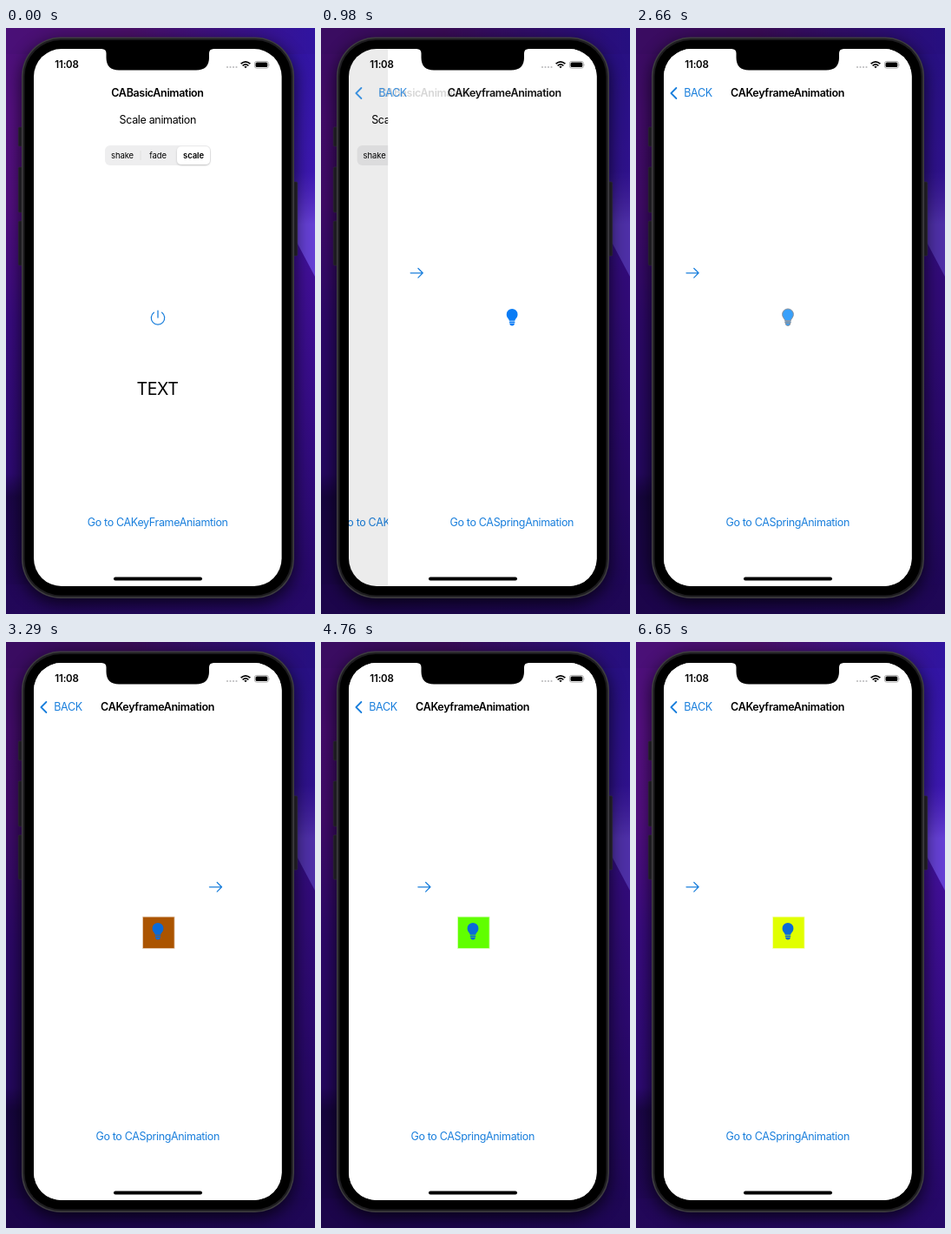
Write an HTML page that moves like this. It is 356 px wide and 674 px high and loops after 6720 ms.

```html
<!DOCTYPE html>
<html lang="en">
<head>
<meta charset="utf-8">
<title>Layer animations</title>
<style>
  html, body { margin: 0; width: 100%; height: 100%; overflow: hidden; background: #14042f; }
  svg { display: block; width: 356px; height: 674px; }
  text { font: 400 12.5px Inter, Roboto, sans-serif; letter-spacing: -.34px; text-anchor: middle; }
  .bold { font-weight: 600; }
  .link { fill: #1a7fdc; }
  .seg { font-size: 9.5px; letter-spacing: -.1px; }
  .clock { font-size: 11.5px; letter-spacing: -.2px; }
  .big { font-size: 19.6px; letter-spacing: -.4px; }
  .line { fill: none; stroke: #1a7fdc; stroke-width: 1.25; stroke-linecap: round; stroke-linejoin: round; }
</style>
</head>
<body>
<svg viewBox="0 0 356 674">
  <defs>
    <linearGradient id="leftWall" x2="0" y2="1">
      <stop offset="0" stop-color="#4a1078"/>
      <stop offset=".15" stop-color="#561082"/>
      <stop offset=".3" stop-color="#520f80"/>
      <stop offset=".5" stop-color="#390b80"/>
      <stop offset=".76" stop-color="#2e0a74"/>
      <stop offset=".8" stop-color="#1b0648"/>
      <stop offset="1" stop-color="#220758"/>
    </linearGradient>
    <linearGradient id="rightWall" x2="0" y2="1">
      <stop offset="0" stop-color="#3014a0"/>
      <stop offset=".25" stop-color="#3c18b0"/>
      <stop offset=".42" stop-color="#400f96"/>
      <stop offset=".65" stop-color="#360c86"/>
      <stop offset="1" stop-color="#240864"/>
    </linearGradient>
    <linearGradient id="ridge" x2="0" y2="1">
      <stop offset="0" stop-color="#5a35cc" stop-opacity="0"/>
      <stop offset=".5" stop-color="#6540d4"/>
    </linearGradient>
    <linearGradient id="ceiling">
      <stop offset="0" stop-color="#4a1078"/>
      <stop offset=".4" stop-color="#4a1068"/>
      <stop offset="1" stop-color="#3014a0"/>
    </linearGradient>
    <linearGradient id="floor">
      <stop offset="0" stop-color="#220758"/>
      <stop offset="1" stop-color="#260968"/>
    </linearGradient>
    <clipPath id="screen"><rect x="32" y="24" width="285.6" height="618" rx="32"/></clipPath>
    <filter id="soft" x="-20%" y="-20%" width="140%" height="150%">
      <feDropShadow dx="0" dy="1" stdDeviation="1" flood-opacity=".2"/>
    </filter>
    <filter id="blur" x="-20%" y="-20%" width="140%" height="140%">
      <feGaussianBlur stdDeviation="10"/>
    </filter>
  </defs>

  <!-- wallpaper -->
  <rect width="178" height="674" fill="url(#leftWall)"/>
  <rect x="178" width="178" height="674" fill="url(#rightWall)"/>
  <path d="M322 165H356V286L322 222Z" fill="url(#ridge)"/>
  <rect width="356" height="30" fill="url(#ceiling)"/>
  <rect y="640" width="356" height="34" fill="url(#floor)"/>
  <rect id="dim" width="356" height="674" fill="#080020" opacity="0"/>

  <!-- phone body -->
  <rect x="18" y="17" width="314" height="645" rx="45" opacity=".75" filter="url(#blur)"/>
  <g fill="#1d1b21" stroke="#302e35" stroke-width=".6">
    <rect x="14.3" y="114" width="5" height="22" rx="1.5"/>
    <rect x="14.3" y="160" width="5" height="52" rx="1.5"/>
    <rect x="14.3" y="222" width="5" height="51" rx="1.5"/>
    <rect x="330.7" y="177" width="5" height="85" rx="1.5"/>
  </g>
  <rect x="18" y="10.5" width="314" height="645.5" rx="45" fill="#3e3d40"/>
  <rect x="19.5" y="12" width="311" height="642.5" rx="43.5" fill="#1e1d20"/>
  <rect x="21.5" y="14" width="307" height="638.5" rx="41.5" fill="#000"/>

  <g clip-path="url(#screen)">
    <rect x="32" y="24" width="286" height="618" fill="#fff"/>
    <g id="first">
      <text x="174.8" y="110">Scale animation</text>
      <rect x="114" y="135" width="122" height="23" rx="6" fill="#eeeeef"/>
      <path d="M155 141V152" stroke="#dcdcde" stroke-width=".8"/>
      <rect x="197" y="136.3" width="38" height="20.6" rx="5" fill="#fff" filter="url(#soft)"/>
      <text class="seg" x="134" y="150">shake</text>
      <text class="seg" x="175" y="150">fade</text>
      <text class="seg bold" x="216" y="150">scale</text>
      <path class="line" d="M170.4 327.2A7.7 7.7 0 1 0 179.6 327.2M175 325V333"/>
      <text class="big" x="174.5" y="422.2">TEXT</text>
      <text class="link" x="174.7" y="572.8">Go to CAKeyFrameAniamtion</text>
    </g>
    <rect id="shade" x="32" y="24" width="286" height="618" opacity="0"/>

    <g id="second">
      <rect x="32" y="24" width="286" height="618" fill="#fff"/>
      <path id="arrow" class="line" d="M-7 0H7M1.8 -5.3L7.1 0L1.8 5.3"/>
      <rect id="box" x="157.2" y="315.8" width="37.2" height="37" stroke="#fff" stroke-opacity=".6" stroke-width="1.6"/>
      <g id="bulb">
        <path d="M171.7 336.8C171.7 334.4 168.6 333.2 168.6 329.4A6.4 6.4 0 0 1 181.4 329.4C181.4 333.2 178.3 334.4 178.3 336.8Z"/>
        <rect x="171.6" y="337.4" width="6.8" height="1.6" rx=".8"/>
        <path d="M172 339.5H178Q177.6 342.4 175 342.4T172 339.5Z"/>
      </g>
      <text class="link" x="174.7" y="572.8">Go to CASpringAnimation</text>
    </g>

    <!-- navigation bar -->
    <text id="oldTitle" class="bold" x="174.5" y="79">CABasicAnimation</text>
    <g id="back">
      <path d="M46.4 69L40.4 75L46.4 81" fill="none" stroke="#1a7fdc" stroke-width="1.8" stroke-linecap="round" stroke-linejoin="round"/>
      <text id="backText" class="link" x="71.5" y="79">BACK</text>
    </g>
    <text id="newTitle" class="bold" x="174.6" y="79">CAKeyframeAnimation</text>

    <!-- status bar -->
    <text class="clock bold" x="70" y="46.2">11:08</text>
    <g fill="#bdbdbf">
      <circle cx="255" cy="45" r="1.1"/><circle cx="258.5" cy="45" r="1.1"/>
      <circle cx="262" cy="45" r="1.1"/><circle cx="265.5" cy="45" r="1.1"/>
    </g>
    <g fill="none" stroke="#000" stroke-width="1.6">
      <path d="M270.6 41.2Q276 36.4 281.4 41.2M272.6 43.3Q276 40.4 279.4 43.3"/>
      <path d="M274.3 44.5Q276 43.2 277.7 44.5L276 46.3Z" fill="#000" stroke="none"/>
    </g>
    <rect x="286.4" y="38.4" width="16" height="7.8" rx="2.4" fill="none" stroke="#999" stroke-width=".8"/>
    <rect x="287.5" y="39.5" width="13.8" height="5.6" rx="1.5"/>
    <path d="M303.3 41V43.8Q304.3 42.4 303.3 41Z" fill="#999"/>
    <rect x="124" y="631.6" width="102" height="4" rx="2"/>
  </g>

  <path d="M110 23V24Q115.5 24.2 115.5 29V34Q115.5 48.5 130 48.5H219Q234 48.5 234 34V29Q234 24.2 239.5 24V23Z"/>
  <path id="cursor" d="M171.8 335.2V350L175.2 346.9L177.5 352.8L180.2 351.7L177.8 346H182.4Z" stroke="#fff" stroke-width="1" stroke-linejoin="round"/>
</svg>
<script>
  const LOOP = 6720, STEP = 70;
  const $ = id => document.getElementById(id);
  const el = {};
  for (const id of ['dim', 'first', 'shade', 'second', 'arrow', 'box', 'bulb',
                    'oldTitle', 'back', 'backText', 'newTitle', 'cursor']) el[id] = $(id);
  const set = (id, name, value) => el[id].setAttribute(name, value);
  const slide = (id, x) => set(id, 'transform', `translate(${x.toFixed(2)} 0)`);
  const show = (id, on) => set(id, 'visibility', on ? 'visible' : 'hidden');

  // time, red, green
  const colors = [[2800, 255, 0], [3850, 76, 180], [4240, 0, 255], [4760, 96, 255], [5390, 255, 255]];

  function boxColor(t) {
    if (t >= 6580) return 'rgb(225,255,0)';
    let i = 0;
    while (i < colors.length - 2 && t > colors[i + 1][0]) i++;
    const [a, b] = [colors[i], colors[i + 1]];
    const k = Math.min(1, Math.max(0, (t - a[0]) / (b[0] - a[0])));
    const mix = n => Math.round(a[n] + (b[n] - a[n]) * k);
    return `rgb(${mix(1)},${mix(2)},0)`;
  }

  // share of the push still to go, critically damped
  function pushLeft(t) {
    const s = Math.max(0, t - 790) / 1000 * 17.4;
    return t >= 1470 ? 0 : (1 + s) * Math.exp(-s);
  }

  function arrowX(t) {
    const cycles = (t - 2838) / 1030;
    if (cycles <= 0 || cycles >= 3) return 65;
    return 65 + 201 * (1 - Math.abs(1 - 2 * (cycles % 1)));
  }

  function draw(t) {
    const left = pushLeft(t), done = 1 - left;
    set('dim', 'opacity', t >= 630 && t < 6580 ? .25 : 0);
    slide('first', -86 * done);
    set('shade', 'opacity', .09 * done);
    slide('second', 286 * left);
    show('second', left < 1);

    slide('oldTitle', -65 * done);
    set('oldTitle', 'opacity', left);
    set('back', 'opacity', done);
    slide('backText', 70 * left);
    slide('newTitle', 232 * left);
    set('newTitle', 'opacity', Math.min(1, done * 1.1));

    set('arrow', 'transform', `translate(${arrowX(t).toFixed(2)} 281.8)`);
    const lit = t >= 2800, pressed = t >= 2660 && !lit;
    show('box', lit && left < 1);
    set('box', 'fill', boxColor(t));
    set('bulb', 'fill', pressed ? '#38a0fb' : lit ? '#0a6ad8' : '#0a7cf5');
    set('bulb', 'stroke', pressed ? '#8a929c' : 'none');
    show('cursor', t >= 3570 && t < 4130);
  }

  const start = performance.now();
  function tick() {
    const t = (performance.now() - start) % LOOP;
    draw(Math.floor(t / STEP) * STEP);
    requestAnimationFrame(tick);
  }
  tick();
</script>
</body>
</html>
```
